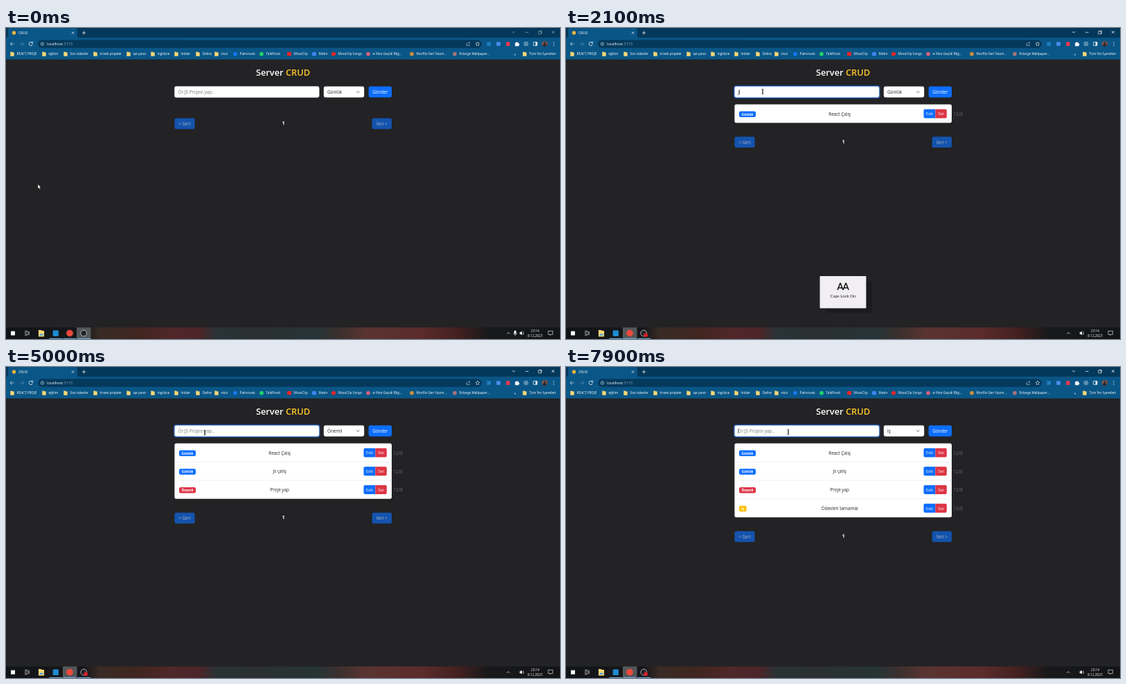
These frames come from a looping animation (800 by 450 pixels, 8 s). An HTML page:

```html
<!DOCTYPE html>
<html lang="tr">
<head>
<meta charset="utf-8">
<title>CRUD</title>
<style>
html, body { margin: 0; width: 100%; height: 100%; overflow: hidden; background: #232224; }
svg { display: block; width: 800px; height: 450px; }
text { font-family: "Open Sans", "Noto Sans", sans-serif; white-space: pre; }
</style>
</head>
<body>
<svg id="stage" viewBox="0 0 800 450"></svg>
<script>
const LOOP = 8000;
const BLUE = '#0d6efd', RED = '#dc3545', YELLOW = '#ffc107', INK = '#212529';
const stage = document.getElementById('stage');

// Markup helpers
const rect = (x, y, w, h, fill, r = 0, more = '') =>
  `<rect x="${x}" y="${y}" width="${w}" height="${h}" rx="${r}" fill="${fill}" ${more}/>`;
const dot = (x, y, r, fill, more = '') => `<circle cx="${x}" cy="${y}" r="${r}" fill="${fill}" ${more}/>`;
const line = (d, color = '#fff', w = .7, more = '') =>
  `<path d="${d}" fill="none" stroke="${color}" stroke-width="${w}" ${more}/>`;
const text = (x, y, s, size, fill = '#fff', more = '') =>
  `<text x="${x}" y="${y}" font-size="${size}" fill="${fill}" ${more}>${s}</text>`;
const mid = 'text-anchor="middle"';
const group = (id, body, more = '') => `<g id="${id}" ${more}>${body}</g>`;

const folder = (x, y, s = 1) =>
  `<path transform="translate(${x} ${y}) scale(${s})" fill="#f8d775" d="M-2.7-3.2h2.4l.6.8h2.4v5.6h-5.4z"/>`;

function browser() {
  const folders = [[9, 'REACT PROJE'], [55, 'eğitim'], [86, 'Son ödevler'], [129, 'örnek projeler'],
    [177, 'işe yarar'], [212, 'ingilizce'], [246, 'linkler'], [277, 'Defne'], [304, 'okul'],
    [749, 'Tüm Yer İşaretleri']];
  const sites = [[331, 'Palmnook', '#1877f2', 1], [369, 'TalkPond', '#25d366', 1], [409, 'MossClip', '#f22323', 0],
    [445, 'Metin', '#4285f4', 0], [473, 'MossClip Songs', '#f22323', 1], [523, 'e-Yöre Geçidi Bilg...', '#d8607c', 1],
    [586, 'Morfilo Seri Yazım...', '#c98d3c', 1], [648, 'Enlarge Wallpaper...', '#a3747c', 1]];
  const label = (x, s) => text(x + 6.6, 39.4, s, 4.75);
  return rect(0, 0, 800, 14, '#04385a') + rect(0, 14, 800, 31.5, '#0a5687')
    + `<path d="M1 14q2 0 2-2V3q0-3 3-3h94q3 0 3 3v9q0 2 2 2z" fill="#0a5687"/>`
    + dot(11.5, 7, 2.7, '#e9b63b') + text(18, 9, 'CRUD', 4.9)
    + line('M95 5.4l3.2 3.2m0-3.2l-3.2 3.2') + line('M110 7h5m-2.5-2.5v5')
    + line('M6 23h5.5m-2.7-2.7L6 23l2.8 2.7', '#d5e2eb')
    + line('M20 23h5.5m-2.8-2.7l2.8 2.7-2.8 2.7', '#5c8fb0')
    + line('M38 21.2a2.7 2.7 0 1 0 .5 2.3M38.5 19.8v2h-2', '#fff', .8)
    + rect(46, 17.3, 641, 11.4, '#04395c', 5.7)
    + dot(52.5, 23, 2.3, 'none', 'stroke="#d8e4ec" stroke-width=".6"') + line('M52.5 22.5v1.8m0-3v.6', '#d8e4ec')
    + text(59, 25.1, 'localhost<tspan fill="#8eabc0">:5173</tspan>', 5.5)
    + line('M665 22v3.4h4.6V23.5M666.6 23.5q.4-2.4 3-2.4m-1.2-1.2l1.3 1.2-1.3 1.2', '#b9cfdd', .6)
    + line('M681 20l.9 2 2.1.2-1.6 1.4.5 2.1-1.9-1.1-1.9 1.1.5-2.1-1.6-1.4 2.1-.2z', '#e2ecf2', .6)
    + rect(694.5, 20.3, 5.4, 5.4, '#247ec2') + rect(708.3, 20.2, 5.6, 5.6, '#4c8df0', .6) + rect(722.3, 20, 5.2, 6, '#e8384f', 1)
    + `<path d="M735.2 21.3h1.6a1 1 0 0 1 2 0h1.7v1.7a1 1 0 0 1 0 2v1.2h-5.3z" fill="#fff"/>`
    + rect(748.5, 20.4, 5, 5, 'none', 1.4, 'stroke="#dce7ee" stroke-width=".7"') + dot(751, 23, 1, '#dce7ee')
    + rect(761.6, 20.4, 5.4, 5, 'none', .5, 'stroke="#fff" stroke-width=".7"') + rect(764.7, 20.4, 2.3, 5, '#fff')
    + dot(778, 23, 4, '#8a5546') + `<path d="M775 25.7a3 2.7 0 0 1 6 0 4 4 0 0 1-6 0z" fill="#2b2b35"/>` + dot(778, 21.5, 1.5, '#2b2b35')
    + [20.7, 23, 25.3].map(y => dot(791, y, .6, '#fff')).join('')
    + group('controls', line('M730.8 5l2.2 2 2.2-2') + line('M750 6.3h4.6')
      + line('M768.8 5h3.8v3.8h-3.8zM769.8 5v-1h3.8v3.8h-1', '#fff', .6) + line('M788 4l4 4m0-4l-4 4'))
    + folders.map(([x, s]) => folder(x, 37.6) + label(x, s)).join('')
    + sites.map(([x, s, c, round]) => (round ? dot(x, 37.6, 2.9, c) : rect(x - 2.9, 35, 5.8, 5.2, c, .6)) + label(x, s)).join('')
    + text(733.6, 39.5, '»', 6);
}

function form() {
  const ring = 'stroke="rgba(13,110,253,.38)" stroke-width="2.2"';
  return text(400, 68.6, 'Server <tspan fill="#ffc929">CRUD</tspan>', 12.8, '#fff', mid + ' font-weight="600"')
    + group('ring', rect(242.7, 83.8, 210.2, 17.4, 'none', 3, ring))
    + rect(243.4, 84.5, 208.8, 16, '#fff', 2.4, 'id="box" stroke-width=".6"')
    + text(248.6, 95, '', 6.4, INK, 'id="entry"') + line('M0 89v7.2', '#111', .55, 'id="caret"')
    + rect(458.8, 84.5, 58.4, 16, '#fff', 2.4) + text(464, 95, '', 6.3, INK, 'id="choice"')
    + line('M506 91.4l2.2 2.2 2.2-2.2', '#343a40', .8)
    + rect(523.6, 84.5, 33.4, 16, BLUE, 2.4) + text(540.3, 95, 'Gönder', 6.3, '#fff', mid);
}

const tasks = [['Günlük', BLUE, 'React Çalış', 1300], ['Günlük', BLUE, 'Js çalış', 2800],
  ['Önemli', RED, 'Proje yap', 4500], ['İş', YELLOW, 'Ödevleri tamamla', 7600]];
const ROW = 26.75, TOP = 110.6;

function list() {
  return rect(243.4, TOP, 313.6, 0, '#fff', 2.4, 'id="sheet"') + tasks.map(([tag, color, name], i) => {
    const y = TOP + i * ROW, w = tag.length > 2 ? 24 : 10.6;
    return `<g class="task">` + (i ? line(`M243.4 ${y}h313.6`, '#dee2e6', .5) : '')
      + rect(250, y + 9.8, w, 8.6, color, 2.2)
      + text(250 + w / 2, y + 16, tag, 4.7, '#fff', mid + ' font-weight="700"')
      + text(395.2, y + 16.1, name, 6.35, INK, mid)
      + `<path d="M533.3 ${y + 7}h-14.8q-2 0-2 2v9q0 2 2 2h14.8z" fill="${BLUE}"/>`
      + `<path d="M533.3 ${y + 7}h14.5q2 0 2 2v9q0 2-2 2h-14.5z" fill="${RED}"/>`
      + text(525, y + 15.8, 'Edit', 5.5, '#fff', mid) + text(541.4, y + 15.8, 'Del', 5.5, '#fff', mid)
      + text(559.7, y + 16.2, '12/8', 6.3, '#6b6a6e') + '</g>';
  }).join('');
}

function pager() {
  const button = (x, w, s) => rect(x, 130.5, w, 15.8, '#1453ad', 2.4) + text(x + w / 2, 140.9, s, 6.3, '#aab6c6', mid);
  return group('pager', button(243.4, 29.2, '&lt; Geri') + button(528.6, 28.4, 'İleri &gt;')
    + text(400.6, 139.8, '1', 7.4, '#fff', mid + ' font-weight="700"'));
}

function popup() {
  return group('popup', rect(374, 366, 68, 46, 'rgba(0,0,0,.2)', 1) + rect(366.6, 359, 66.8, 46.5, '#f1eff2')
    + line('M392 379l3.8-9.4h.6l3.6 9.4m-6.8-3h5.6M400.2 379l3.6-9.4h.6l3.8 9.4m-6.8-3h5.6', '#111', 1.5)
    + line('M392 380.8l16.5-14.4', '#111', 1.5, 'id="slash"')
    + text(400, 389.6, '', 6.1, '#222', mid + ' id="caps" style="font-family:Lato,sans-serif"'));
}

function taskbar() {
  const stops = [[0, '#111417'], [14, '#16171a'], [17, '#392b24'], [24, '#40251f'], [30, '#50282a'], [35, '#4b2528'],
    [38, '#293235'], [46, '#2a3032'], [56, '#263435'], [60, '#3a302e'], [65, '#5a3431'], [75, '#5b2c2b'],
    [82, '#40201f'], [87, '#17191b'], [100, '#121416']];
  const low = x => line(`M${x} 449.4h19`, '#77b9e8', 1);
  return `<defs><linearGradient id="bar">${stops.map(([o, c]) => `<stop offset="${o}%" stop-color="${c}"/>`).join('')}</linearGradient></defs>`
    + rect(0, 433.3, 800, 16.7, 'url(#bar)') + rect(102, 433.3, 20.5, 16.7, '#53575a', 0, 'id="active"')
    + rect(7, 438.7, 6, 6, '#f2f5f7')
    + line('M27.8 440h4.4v3.2h-4.4zM27 438.4h4m-4 6.4h4M33.3 438.5v6', '#e8e8e8', .6)
    + folder(51, 441.7, 1.5) + rect(48.6, 442.5, 5, 2.5, '#52a9dc')
    + rect(67.7, 437.5, 8.2, 8.4, '#1f8ad2', 1) + dot(92, 441.6, 4.9, '#e94a3b')
    + dot(112.2, 441.6, 4.4, '#252329', 'stroke="#d5d5d5" stroke-width=".8"') + dot(115.2, 444.3, 2.8, '#e31e24', 'id="rec"')
    + low(62.5) + low(82.5) + low(103)
    + line('M723.2 442.8l2.2-2.2 2.2 2.2')
    + group('mic', rect(733.8, 437.8, 2.8, 4.8, '#fff', 1.4) + line('M732.8 441.2q0 2.5 2.4 2.5t2.4-2.5M735.2 443.6v1.8', '#fff', .6))
    + `<path d="M741.8 440.3h1.3l1.8-1.7v6l-1.8-1.7h-1.3z" fill="#fff"/>`
    + line('M745.8 440.1q1 1.5 0 3m1-4q1.8 2.5 0 5', '#fff', .5)
    + text(764, 440.1, '23:14', 4.7, '#fff', mid) + text(764, 447.2, '8.12.2023', 4.7, '#fff', mid)
    + line('M783 438.4h6.4v5h-2.5l-1.2 1.4v-1.4H783z', '#fff', .6);
}

function pointer() {
  const beam = 'M-1.4-3.4h1q.4 0 .4.4v6q0 .4-.4.4h-1M1.4-3.4h-1q-.4 0-.4.4v6q0 .4.4.4h1';
  return group('arrow', '<path d="M0 0v6.6l1.5-1.4 1 2.3 1.1-.5-1-2.2h2z" fill="#fff" stroke="#000" stroke-width=".4"/>')
    + group('beam', line(beam, '#111', .7));
}

stage.innerHTML = rect(0, 0, 800, 450, '#232224') + form() + list() + pager() + popup() + browser() + taskbar() + pointer();
const el = Object.fromEntries([...stage.querySelectorAll('[id]')].map(n => [n.id, n]));
const rows = [...stage.querySelectorAll('.task')];
const show = (node, on) => node.style.display = on ? '' : 'none';
const within = (t, spans) => spans.some(([a, b]) => t >= a && t < b);

// Typing: start, duration, cleared at, text already there, text added
const typing = [[550, 650, 1300, '', 'React Çalış'], [2050, 650, 2800, '', 'Js çalış'], [2950, 650, 4500, '', 'Proje yap'],
  [5700, 750, 6500, '', 'Ödevleri y'], [6500, 550, 7600, 'Ödevleri ', 'tamamla']];
const capsOn = [[450, 700], [2000, 2200], [2900, 3050], [5650, 5850]];
const capsOff = [[700, 1600], [2200, 2700], [3050, 3600], [5850, 6550]];
const focus = [[450, 3700], [4850, 7100], [7750, LOOP]];
const path = [[0, 46, 226], [100, 46, 226], [420, 284, 92], [3600, 284, 92], [3850, 488, 92], [4150, 488, 98],
  [4400, 540, 93], [4550, 540, 93], [4850, 287, 95], [7050, 287, 95], [7250, 488, 93], [7350, 488, 98],
  [7520, 540, 93], [7620, 540, 93], [7800, 321, 94], [LOOP, 321, 94]];

function pointerAt(t) {
  const i = path.findIndex(p => p[0] > t), a = path[i - 1], b = path[i];
  const k = (t - a[0]) / (b[0] - a[0]), e = k * k * (3 - 2 * k);
  return [a[1] + (b[1] - a[1]) * e, a[2] + (b[2] - a[2]) * e];
}

function draw(t) {
  const seg = typing.find(s => t >= s[0] && t < s[2]);
  const typed = seg ? seg[3] + seg[4].slice(0, Math.floor(seg[4].length * (t - seg[0]) / seg[1]) + 1) : '';
  el.entry.textContent = typed || 'Ör:JS Projesi yap..';
  el.entry.setAttribute('fill', typed ? INK : '#737a80');
  const focused = within(t, focus);
  show(el.ring, focused);
  el.box.setAttribute('stroke', focused ? '#86b7fe' : '#ced4da');
  show(el.caret, focused && !within(t, [[4850, 5200]]));
  const width = typed ? el.entry.getComputedTextLength() : 0;
  el.caret.setAttribute('transform', `translate(${248.8 + width})`);
  el.choice.textContent = t < 4150 ? 'Günlük' : t < 7350 ? 'Önemli' : 'İş';

  const count = tasks.filter(task => t >= task[3]).length;
  rows.forEach((row, i) => show(row, i < count));
  el.sheet.setAttribute('height', count * ROW);
  el.pager.setAttribute('transform', `translate(0 ${count * ROW})`);

  const off = within(t, capsOff);
  show(el.popup, off || within(t, capsOn));
  show(el.slash, off);
  el.caps.textContent = 'Caps Lock ' + (off ? 'Off' : 'On');

  const started = t >= 200;
  el.controls.setAttribute('opacity', started ? 1 : .55);
  el.active.setAttribute('x', started ? 82 : 102);
  show(el.rec, started);
  show(el.mic, t < 1700);

  const [x, y] = pointerAt(t), overInput = x > 243 && x < 452 && y > 84 && y < 101;
  show(el.beam, overInput);
  show(el.arrow, !overInput);
  (overInput ? el.beam : el.arrow).setAttribute('transform', `translate(${x} ${y})`);
}

const start = performance.now();
function tick() {
  draw((performance.now() - start) % LOOP);
  requestAnimationFrame(tick);
}
tick();
</script>
</body>
</html>
```
